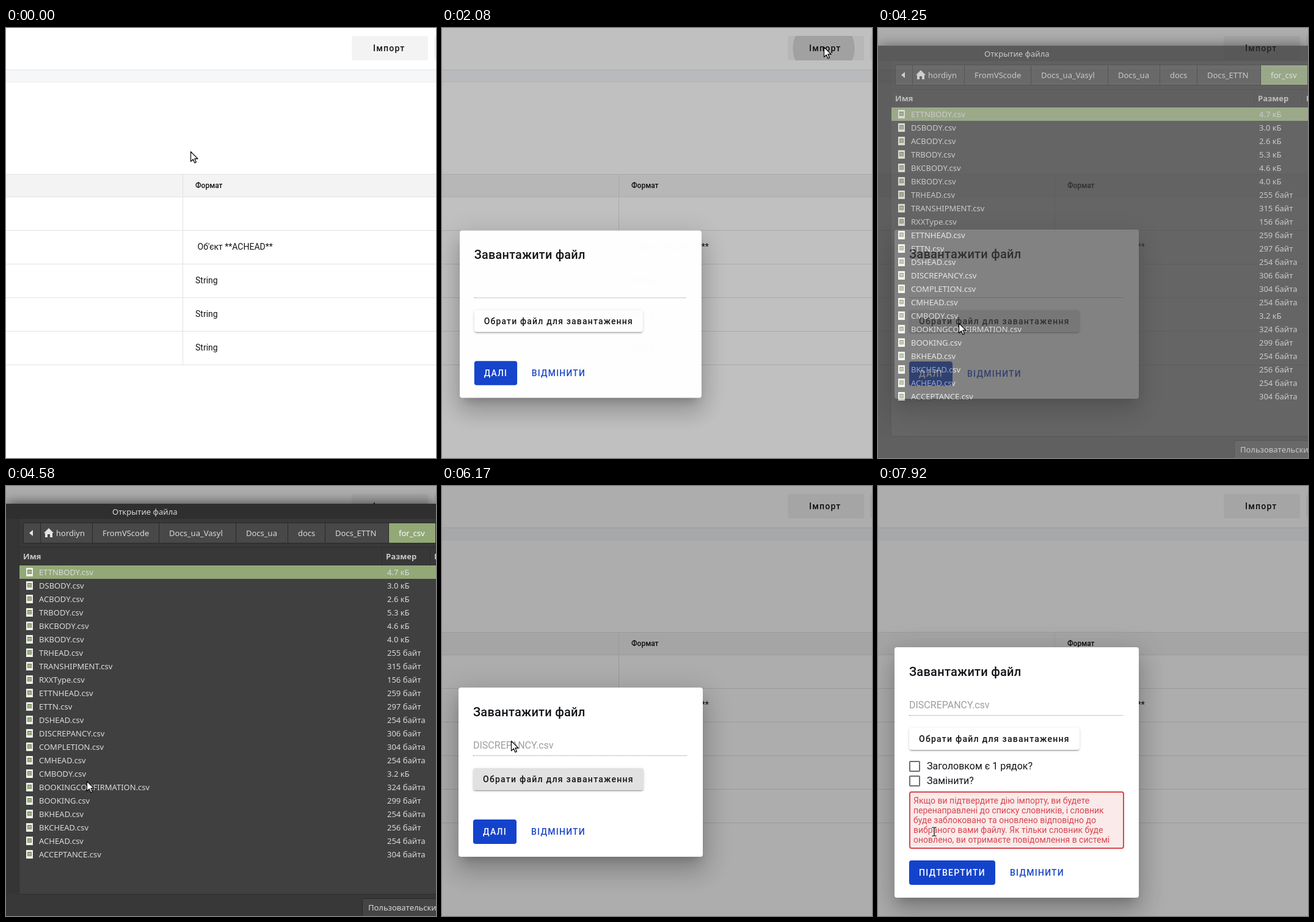
An HTML page for the animation above (8 s loop, 704 by 704 pixels).

```html
<!DOCTYPE html>
<html lang="uk">
<meta charset="utf-8">
<title>Імпорт</title>
<style>
html, body { margin: 0; width: 100%; height: 100%; overflow: hidden; background: #fff }
#stage { position: relative; width: 704px; height: 704px; overflow: hidden; font: 14px/20px Roboto, sans-serif; color: #111418 }
#stage div, #stage svg { position: absolute; box-sizing: border-box }
.t { white-space: pre }
.btn { font-weight: 500; letter-spacing: 1.25px }
.native { font: 13px/20px "Noto Sans", sans-serif; color: #dadada }
.modal { background: #fff; border-radius: 4px; box-shadow: 0 11px 15px -7px #0003, 0 24px 38px 3px #00000024, 0 9px 46px 8px #0000001f }
.raised { border-radius: 4px; overflow: hidden; box-shadow: 0 3px 1px -2px #0003, 0 2px 2px #00000024, 0 1px 5px #0000001f }
.warn { border: 2px solid #d9474e; border-radius: 4px; background: #faeaea; color: #d6474f; padding: 5px; line-height: 16px; white-space: pre }
</style>
<div id="stage"></div>
<script>
const stage = document.getElementById('stage');

function box(parent, x, y, w, h, css = '', cls = '') {
  const el = document.createElement('div');
  el.className = cls;
  el.style.cssText = `left:${x}px;top:${y}px;width:${w}px;height:${h}px;${css}`;
  parent.append(el);
  return el;
}
// cy is the vertical middle of the capitals
function text(parent, x, cy, str, css = '', cls = '') {
  const el = box(parent, x, cy - 10, 0, 20, css, 't ' + cls);
  el.textContent = str;
  return el;
}
function art(parent, x, y, body) {
  const el = box(parent, x, y, 0, 0);
  el.innerHTML = `<svg width="24" height="24" style="left:0;top:0;overflow:visible">${body}</svg>`;
  return el;
}
const show = (el, on) => el.style.visibility = on ? 'inherit' : 'hidden';
const clamp = v => Math.max(0, Math.min(1, v));

// Page
box(stage, 0, 68, 704, 21, 'background:#f6f7f9;border:solid #e2e5e9;border-width:1px 0;border-bottom-color:#eceef0');
const importBtn = box(stage, 566, 13, 125, 40, 'background:#f3f3f3;border-radius:4px;overflow:hidden');
const importRipple = box(importBtn, 9, -30, 100, 100, 'background:#000;border-radius:50%');
text(importBtn, 35, 20, 'Імпорт', '', 'btn');
box(stage, 701, 13, 40, 40, 'background:#f3f3f3;border-radius:4px');
box(stage, 0, 239, 704, 38, 'background:#f3f3f3');
for (const y of [239, 276, 331, 386, 441, 496, 551]) box(stage, 0, y, 704, 1, 'background:#e2e2e2');
box(stage, 289, 239, 1, 313, 'background:#e2e2e2');
text(stage, 310, 258, 'Формат', 'font-size:12px;font-weight:500');
text(stage, 313.5, 358, "Об'єкт **ACHEAD**");
for (const y of [413, 468, 523]) text(stage, 310, y, 'String');
const scrim = box(stage, 0, 0, 704, 704, 'background:#000');

// Upload dialog
const modal = box(stage, 27, 330, 400, 277, '', 'modal');
text(modal, 24, 40, 'Завантажити файл', 'font-size:20px;font-weight:500;letter-spacing:.25px');
const fileName = text(modal, 24, 95, 'DISCREPANCY.csv', 'font-size:16px;color:#9e9e9e');
box(modal, 24, 111, 350, 1, 'border-top:1px dotted #8c8c8c');
const pick = box(modal, 24, 132, 279, 36, '', 'raised');
const pickRipple = box(pick, -40, -102, 240, 240, 'background:#0000000d;border-radius:50%');
text(pick, 16, 18, 'Обрати файл для завантаження', '', 'btn');

function step(y, label, w) {
  const el = box(modal, 0, 0, 400, 0);
  const ok = box(el, 24, y, w, 40, 'background:#1443cb;border-radius:4px');
  text(ok, 16, 20, label, 'color:#fff', 'btn');
  text(el, 48 + w, y + 20, 'ВІДМІНИТИ', 'color:#1a45c8', 'btn');
  return { el, ok };
}
const first = step(216, 'ДАЛІ', 71);
const second = step(349, 'ПІДТВЕРТИТИ', 141);
['Заголовком є 1 рядок?', 'Замінити?'].forEach((label, i) => {
  box(second.el, 24, 186 + 24 * i, 18, 18, 'border:2px solid #6e6e6e;border-radius:2px');
  text(second.el, 53, 194.5 + 24 * i, label, 'font-size:16px');
});
box(second.el, 24, 236, 352, 94, '', 'warn').textContent =
`Якщо ви підтвердите дію імпорту, ви будете
перенаправлені до списку словників, і словник
буде заблоковано та оновлено відповідно до
вибраного вами файлу. Як тільки словник буде
оновлено, ви отримаєте повідомлення в системі`;

// File chooser
const chooser = box(stage, 0, 29, 704, 675, 'background:#383838;box-shadow:0 0 20px #000a', 'native');
const win = box(chooser, 0, -29, 704, 704);
box(win, 0, 29, 704, 25, 'background:#2f2f2f');
text(win, 174, 42, 'Открытие файла', 'font-weight:500');
box(win, 0, 54, 22, 614, 'background:#353535;border-right:1px solid #303030');
const crumbs = [[28, 0, ''], [56, 82, 'hordiyn'], [141, 158, 'FromVScode'], [250, 267, 'Docs_ua_Vasyl'],
  [376, 393, 'Docs_ua'], [461, 478, 'docs'], [522, 539, 'Docs_ETTN'], [626, 643, 'for_csv']];
crumbs.forEach(([x, tx, label], i) => {
  const end = i < 7 ? crumbs[i + 1][0] : 703;
  box(win, x, 60, end - x + 1, 34, `border:1px solid #292929;background:${i < 7 ? '#484848' : '#92a877'}`);
  text(win, tx, 77, label, i < 7 ? '' : 'color:#fff');
});
art(win, 38, 72, '<path d="M6 0V10L0 5Z" fill="#e4e4e4"/>');
art(win, 62, 69, '<path d="M8 0 16 8H14V15H10V10H6V15H2V8H0Z" fill="#e4e4e4"/>');
box(win, 22, 100, 682, 30, 'background:#383838;border:solid #2e2e2e;border-width:1px 0');
for (const x of [615, 694]) box(win, x, 101, 1, 28, 'background:#2e2e2e');
[[28, 'Имя'], [622, 'Размер'], [701, 'Изменён']].forEach(([x, s]) => text(win, x, 115, s, 'font-weight:600;color:#c8c8c8'));
box(win, 22, 130, 682, 539, 'background:#404040;border-bottom:1px solid #2c2c2c');
const selected = box(win, 22, 130, 682, 22, 'background:#92a877');
const files = `ETTNBODY 4.7 кБ|DSBODY 3.0 кБ|ACBODY 2.6 кБ|TRBODY 5.3 кБ|BKCBODY 4.6 кБ|BKBODY 4.0 кБ|TRHEAD 255 байт
TRANSHIPMENT 315 байт|RXXType 156 байт|ETTNHEAD 259 байт|ETTN 297 байт|DSHEAD 254 байта|DISCREPANCY 306 байт
COMPLETION 304 байта|CMHEAD 254 байта|CMBODY 3.2 кБ|BOOKINGCONFIRMATION 324 байта|BOOKING 299 байт
BKHEAD 254 байта|BKCHEAD 256 байт|ACHEAD 254 байта|ACCEPTANCE 304 байта`.split(/[|\n]/);
files.forEach((line, i) => {
  const [name, ...size] = line.split(' '), y = 141 + 22 * i;
  art(win, 33, y - 7, '<path d="M0 0H11V14H0Z" fill="#f1f1ea"/><path d="M2 3H9V10H2Z" fill="#75895a"/><path d="M3 5.5H8M3 8H8" stroke="#e6eadb"/>');
  text(win, 54, y, name + '.csv');
  text(win, 624, y, size.join(' '));
});
box(win, 583, 675, 140, 40, 'background:#454545;border:1px solid #292929');
text(win, 593, 690, 'Пользовательский');

// Pointers, each with its hot spot at the origin
const line = 'fill="#fff" stroke="#111" stroke-width="1.3" stroke-linejoin="round"';
const pointers = {
  arrow: art(stage, 0, 0, `<path d="M.5.5V16.5L4.3 13 6.8 18.8 9.4 17.7 6.9 12H12Z" ${line}/>`),
  hand: art(stage, 0, 0, `<path d="M0 9V0Q1-1.5 2.2 0V5Q4 4 5 5.4 7 4.6 8 6 10 5.5 10.5 7.5V10L9 14.5H0L-4 9.3Q-4.5 7-2.5 7.4Z" ${line}/><path d="M2.2 5V8M5 6V8M8 6.5V8.5" stroke="#111"/>`),
  beam: art(stage, 0, 0, `<path d="M-4-8H-1L0-7 1-8H4V-6H1V6H4V8H1L0 7-1 8H-4V6H-1V-6H-4Z" fill="#111" stroke="#fff" stroke-width=".7"/>`)
};

const linear = p => p, easeOut = p => p * (2 - p), smooth = p => p * p * (3 - 2 * p);
const route = [[0, 302, 202], [510, 302, 202], [1333, 587, 62, linear], [1667, 625, 31, easeOut], [2420, 625, 31],
  [3250, 176, 550, smooth], [3580, 132, 483, easeOut], [4950, 132, 483], [5420, 97, 395, smooth], [5800, 97, 395],
  [6167, 113, 417, smooth], [6583, 91, 560, smooth], [7400, 92, 566, smooth], [8001, 92, 566]];
function pointerAt(t) {
  const i = route.findIndex(k => k[0] > t), a = route[i - 1], b = route[i];
  const p = (b[3] || linear)((t - a[0]) / (b[0] - a[0]));
  return [a[1] + (b[1] - a[1]) * p, a[2] + (b[2] - a[2]) * p];
}

function draw(t) {
  const [x, y] = pointerAt(t);
  const late = t >= 7500;

  const ripple = clamp((t - 1900) / 240);
  importRipple.style.transform = `scale(${.4 + .8 * ripple})`;
  importRipple.style.opacity = t < 1910 ? 0 : .12 * clamp((2330 - t) / 180);

  const open = clamp((t - 1960) / 160);
  scrim.style.opacity = .32 * open;
  modal.style.opacity = clamp((t - 1960) / 125);
  modal.style.transform = `scale(${1 - .2 * (1 - open) ** 2})`;
  modal.style.top = (late ? 264 : 330) + 'px';
  modal.style.height = (late ? 410 : 277) + 'px';
  show(first.el, !late);
  show(second.el, late);
  show(fileName, t > 5800);
  pick.style.background = t > 3400 && t < 7240 ? '#e1e1e1' : '#fff';
  show(pickRipple, t > 3800 && t < 4160);
  first.ok.style.background = t > 6500 ? '#2450cf' : '#1443cb';

  chooser.style.opacity = Math.min(clamp((t - 4120) / 200), clamp((5750 - t) / 150));
  selected.style.top = (t < 5400 ? 130 : 394) + 'px';

  const over = t > 3160 && t < 4160 || t > 6500 && !late;
  const kind = late ? 'beam' : over ? 'hand' : 'arrow';
  for (const k in pointers) show(pointers[k], k === kind);
  pointers[kind].style.transform = `translate(${Math.round(x)}px,${Math.round(y)}px)`;
}

const stepMs = 1000 / 12;
function tick() {
  draw(Math.floor((performance.now() % 8000 + 4) / stepMs) * stepMs % 8000);
  requestAnimationFrame(tick);
}
tick();
</script>
</html>
```
